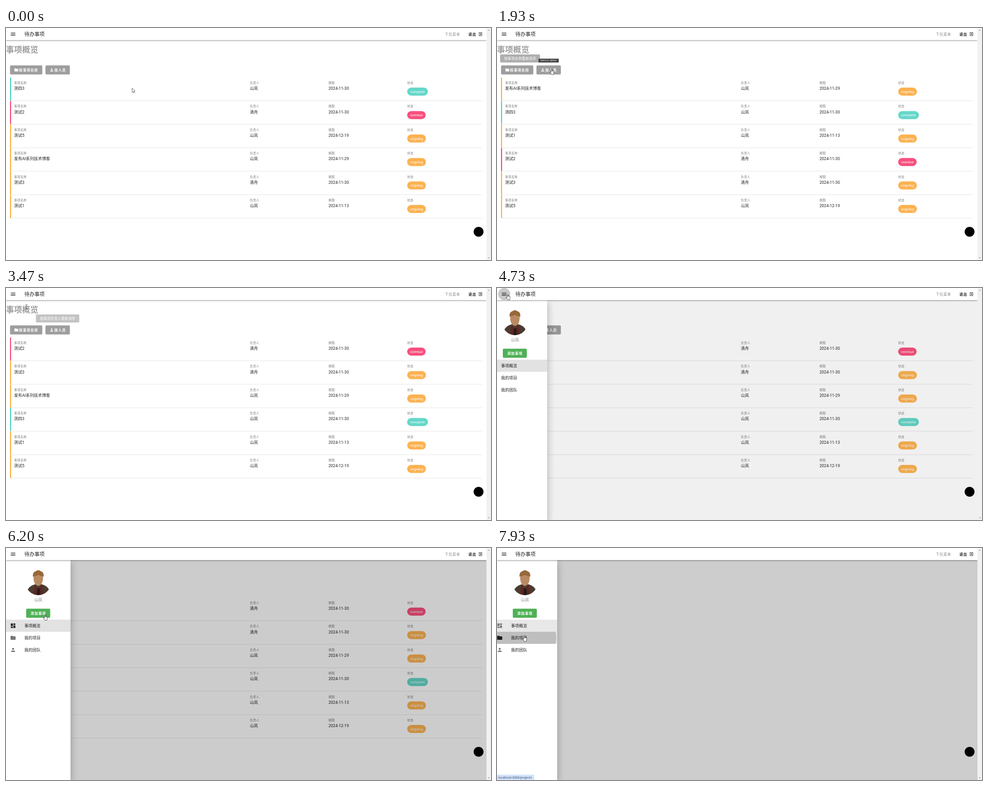
These frames come from a looping animation (1082 by 518 pixels, 8000 ms). An HTML page:

```html
<!DOCTYPE html>
<html lang="zh-CN">
<head>
<meta charset="utf-8">
<title>待办事项</title>
<style>
  html, body { margin: 0; width: 100%; height: 100%; overflow: hidden; background: #fff; }
  #stage { position: relative; width: 1082px; height: 518px; overflow: hidden; background: #fff; }
  #stage > *, #stage svg { position: absolute; left: 0; top: 0; }
  svg { display: block; overflow: hidden; }
  text { font-family: Roboto, "Noto Sans CJK SC", "Noto Sans CJK", sans-serif; font-size: 9.016px; fill: rgba(0,0,0,.87); white-space: pre; }
  .heading { font-size: 18.03px; font-weight: 700; fill: #9e9e9e; }
  .title { font-size: 11.27px; }
  .btn { font-size: 7.89px; font-weight: 700; letter-spacing: .704px; }
  .label { font-size: 6.76px; letter-spacing: .225px; fill: #7b7b7b; }
  .small { font-size: 7.89px; }
  .white { fill: #fff; }
  .grey { fill: #858585; }
  .status { font-family: "Open Sans", "Noto Sans", sans-serif; font-size: 6.9px; fill: #33405a; }
  #scrim { top: 27px !important; width: 1072px; height: 491px; background: #000; opacity: 0; }
  #drawer { top: 27px !important; width: 144px; height: 491px; background: #fff; }
  #drawer svg { top: -27px; overflow: visible; }
  #bar { width: 1072px; height: 27px; background: #fff;
    box-shadow: 0 1.1px 2.3px -.6px rgba(0,0,0,.3), 0 2.3px 2.8px rgba(0,0,0,.2), 0 .6px 5.6px rgba(0,0,0,.16); }
  #shade { width: 1072px; height: 518px; overflow: hidden; }
</style>
</head>
<body>
<div id="stage">
  <svg id="page" width="1072" height="518"></svg>
  <div id="shade"><div id="scrim" style="position:absolute"></div><div id="drawer" style="position:absolute"><svg id="menu" width="144" height="518"></svg></div></div>
  <div id="bar"><svg id="head" width="1072" height="27"></svg></div>
  <svg id="top" width="1082" height="518"></svg>
</div>
<script>
const $ = id => document.getElementById(id);

// markup helpers
const text = (x, y, str, cls = '', more = '') => `<text x="${x}" y="${y}" class="${cls}" ${more}>${str}</text>`;
const rect = (x, y, w, h, fill, r = 0, more = '') =>
  `<rect x="${x}" y="${y}" width="${w}" height="${h}" rx="${r}" fill="${fill}" ${more}/>`;
const ICONS = {
  menu: 'M3 6H21V8H3ZM3 11H21V13H3ZM3 16H21V18H3Z',
  board: 'M3 13H11V3H3ZM3 21H11V15H3ZM13 21H21V11H13ZM13 3V9H21V3Z',
  folder: 'M10 4H4C2.9 4 2 4.9 2 6V18A2 2 0 0 0 4 20H20A2 2 0 0 0 22 18V8C22 6.9 21.1 6 20 6H12Z',
  person: 'M12 4A4 4 0 0 1 12 12A4 4 0 0 1 12 4M12 14C16.4 14 20 15.8 20 18V20H4V18C4 15.8 7.6 14 12 14Z',
  exit: 'M19 3H5C3.9 3 3 3.9 3 5V9H5V5H19V19H5V15H3V19A2 2 0 0 0 5 21H19A2 2 0 0 0 21 19V5C21 3.9 20.1 3 19 3M10.1 15.6L11.5 17L16.5 12L11.5 7L10.1 8.4L12.7 11H3V13H12.7Z'
};
const icon = (name, cx, cy, size, fill, id = '') =>
  `<path id="${id}" d="${ICONS[name]}" fill="${fill}" transform="translate(${cx - size / 2} ${cy - size / 2}) scale(${size / 24})"/>`;

// list
const STATES = {
  complete: ['#3cd1c2', '#65d7c9', 46.2],
  overdue: ['#f83e70', '#f8517e', 41.2],
  ongoing: ['#ffaa2c', '#fcb252', 41.8]
};
const A = '山岚', B = '清舟';
const TASKS = [
  ['测四3', A, '2024-11-30', 'complete'],
  ['测试2', B, '2024-11-30', 'overdue'],
  ['测试5', A, '2024-12-19', 'ongoing'],
  ['发布AI系列技术博客', A, '2024-11-29', 'ongoing'],
  ['测试3', B, '2024-11-30', 'ongoing'],
  ['测试1', A, '2024-11-13', 'ongoing']
];
const ORDERS = [[0, 1, 2, 3, 4, 5], [3, 0, 5, 1, 4, 2], [1, 4, 3, 0, 5, 2]];
const COLS = [18, 544, 719.5, 895];
const LABELS = ['事项名称', '负责人', '期限', '状态'];

const row = ([name, who, due, state], i) => {
  const [edge, fill, w] = STATES[state];
  return `<g id="row${i}">` + rect(9, 110.6, 2.25, 51.6, edge) + rect(9, 162.2, 1053, .7, '#d9d9d9') +
    LABELS.map((l, c) => text(COLS[c], 125.1, l, 'label')).join('') +
    [name, who, due].map((v, c) => text(COLS[c], 138.2, v)).join('') +
    rect(895, 133, w, 18, fill, 9) +
    text(895 + w / 2, 144.8, state, 'small white', 'text-anchor="middle"') + '</g>';
};
const button = (n, x, w, name, label) =>
  `<clipPath id="clip${n}">${rect(x, 83.4, w, 20.3, '#000', 2.25)}</clipPath>` +
  rect(x, 83.4, w, 20.3, '#9e9e9e', 2.25) +
  `<g clip-path="url(#clip${n})"><circle id="wave${n}" cx="${x + w / 2}" cy="93.5" fill="#fff"/></g>` +
  icon(name, x + 14, 93.6, 10.1, '#fff') + text(x + 19.8, 96.7, label, 'btn white');
const tip = (n, x, w, str) => `<g id="tip${n}">` + rect(x, 59, w, 18, '#424242', 2.25) +
  text(x + 9, 70.8, str, 'small white') + '</g>';

$('page').innerHTML = text(0, 55.4, '事项概览', 'heading') +
  `<g id="list">${button(1, 9, 72, 'folder', '按事项名称')}${button(2, 88, 54.5, 'person', '按人员')}` +
  TASKS.map(row).join('') + '</g>' +
  tip(1, 7, 89, '按事项名称重新排序') + tip(2, 66.7, 96.8, '按事项负责人重新排序');

$('head').innerHTML = '<circle id="halo" cx="16" cy="13.5" r="13.6"/>' +
  icon('menu', 15.8, 13.5, 13.5, '#1c1c1c') + text(41, 17.6, '待办事项', 'title') +
  text(978.8, 16.8, '下拉菜单', 'btn grey', 'style="font-weight:500"') +
  text(1031.8, 16.8, '退出', 'btn') + icon('exit', 1058.4, 13.6, 10.1, '#1c1c1c');

const item = (n, name, label) => {
  const y = 160 + n * 27.05;
  return icon(name, 15.8, y + 13.5, 13.5, '#757575', 'icon' + n) + text(41, y + 16.8, label);
};
$('menu').innerHTML =
  `<clipPath id="round"><circle cx="72" cy="77" r="28.2"/></clipPath>
  <clipPath id="clip3">${rect(0, 187.05, 144, 27.05, '#000')}</clipPath>
  <g clip-path="url(#round)">
    <path d="M46 107Q45 88 62 82L72 79L83 82Q99 88 99 107Z" fill="#4b3b30"/>
    <path d="M64 82L72 92L80 82L84 107H61Z" fill="#5e2622"/>
    <path d="M70 90H75L77 107H68Z" fill="#211c1a"/>
    <path d="M61.5 62H82.5V70Q81 83 72 85Q63 83 61.5 70Z" fill="#b98a62"/>
    <path d="M60 64Q59 54 66 52Q72 47 78 52Q85 54 84 64Q72 59 60 64Z" fill="#98683a"/>
  </g>` +
  text(72, 119, A, 'grey', 'text-anchor="middle"') +
  rect(45, 135.4, 53.6, 20.3, '#4fb055', 2.25) + text(54.8, 149, '添加事项', 'btn white') +
  rect(0, 160, 144, 27.05, '#000', 0, 'id="cell0"') + rect(0, 187.05, 144, 27.05, '#000', 0, 'id="cell1"') +
  '<g clip-path="url(#clip3)"><circle id="wave3" cx="72" cy="200.5" fill="#000" opacity=".18"/></g>' +
  item(0, 'board', '事项概览') + item(1, 'folder', '我的项目') + item(2, 'person', '我的团队');

$('top').innerHTML = rect(1072, 0, 10, 518, '#f1f1f1') +
  '<path d="M1074.8 6L1077 3.4L1079.2 6ZM1074.8 512L1077 514.6L1079.2 512Z" fill="#a3a3a3"/>' +
  '<circle cx="1054.3" cy="455" r="11"/>' +
  `<g id="status"><path id="plate" fill="#d3e3fd"/>${text(3, 514.6, '', 'status', 'id="link"')}</g>` +
  `<g id="arrow"><path d="M.3 0V9.6L2.5 7.6L4.1 11.2L5.7 10.5L4.2 7H7Z" fill="#fff" stroke="#222" stroke-width=".7"/></g>
  <g id="hand"><path transform="translate(-3.8 0)" d="M2.8 1.2Q3.8-.4 4.8 1.2V5Q6-.1 6.3 5.3Q7.4 4.7 7.7 5.8Q9 5.3 9 6.8V9Q9 11 8 13H3.8Q3 11 .5 8.4Q0 7 1.3 7.1Q2.2 7.5 2.8 8.2Z" fill="#fff" stroke="#222" stroke-width=".8"/></g>
  <g id="beam"><path d="M-2.3-4.8H-.6L0-4.3L.6-4.8H2.3M0-4.3V4.3M-2.3 4.8H-.6L0 4.3L.6 4.8H2.3" fill="none" stroke="#333" stroke-width=".8"/></g>`;

// pointer track: time, x, y, shape
const TRACK = [
  [0, 281, 134, 'arrow'], [500, 122, 113, 'arrow'], [700, 62, 96, 'hand'], [870, 50, 92, 'hand'],
  [1400, 50, 92, 'hand'], [1800, 78, 91, 'hand'], [1860, 85, 91, 'arrow'], [1930, 121.7, 91, 'hand'],
  [3150, 121.7, 91, 'hand'], [3335, 112, 83, 'hand'], [3395, 84, 66, 'arrow'], [3460, 47, 44, 'beam'],
  [3525, 34, 25, 'arrow'], [3600, 26, 16, 'hand'], [3866, 23.8, 13.4, 'hand'], [5210, 23.8, 13.4, 'hand'],
  [5300, 50, 34, 'arrow'], [5530, 135, 92, 'arrow'], [5735, 135, 92, 'arrow'], [5866, 139, 95, 'arrow'],
  [6130, 96, 140, 'hand'], [6200, 86.8, 148.5, 'hand'], [6600, 57, 171, 'hand'], [7140, 57, 171, 'hand'],
  [7533, 61, 195.4, 'hand']
];

const clamp = v => Math.min(1, Math.max(0, v));
const span = (t, from, len) => clamp((t - from) / len);
const out = p => 1 - (1 - p) ** 3;
// cubic-bezier(.4, 0, .2, 1)
const ease = p => {
  let lo = 0, hi = 1, s = .5;
  for (let i = 0; i < 20; i++) {
    s = (lo + hi) / 2;
    const x = 1.2 * (1 - s) ** 2 * s + .6 * (1 - s) * s * s + s ** 3;
    if (x < p) lo = s; else hi = s;
  }
  return 3 * (1 - s) * s * s + s ** 3;
};
const set = (id, name, v) => $(id).setAttribute(name, v);

function pointer(t) {
  let i = TRACK.length - 1;
  while (TRACK[i][0] > t) i--;
  const a = TRACK[i], b = TRACK[i + 1] || a;
  const p = b === a ? 0 : (t - a[0]) / (b[0] - a[0]);
  const x = a[1] + (b[1] - a[1]) * p, y = a[2] + (b[2] - a[2]) * p;
  for (const shape of ['arrow', 'hand', 'beam']) set(shape, 'display', shape === a[3] ? 'inline' : 'none');
  set(a[3], 'transform', `translate(${x} ${y})`);
}

function tooltip(t, n, cx, start, end) {
  const s = out(span(t, start, 150));
  set('tip' + n, 'transform', `translate(${cx} 77) scale(${s}) translate(${-cx} -77)`);
  set('tip' + n, 'opacity', s ? 1 - span(t, end, 75) : 0);
}

function wave(t, n, start, size) {
  set('wave' + n, 'r', size * out(span(t, start, 300)));
  set('wave' + n, 'opacity', .22 * (1 - span(t, start + 200, 300)));
}

function render(t) {
  const order = ORDERS[t < 1190 ? 0 : t < 2530 ? 1 : 2];
  order.forEach((id, place) => set('row' + id, 'transform', `translate(0 ${place * 52.4})`));
  const left = t > 7920;
  set('list', 'display', left ? 'none' : 'inline');

  tooltip(t, 1, 45, 782, 1890);
  tooltip(t, 2, 115.2, 1905, 3415);
  wave(t, 1, 1050, 38);
  wave(t, 2, 2460, 30);

  set('halo', 'opacity', t < 4530 ? 0 : .24 * (1 - span(t, 4700, 290)));

  const open = ease(span(t, 4633, 200)) - ease(span(t, 7903, 200));
  $('drawer').style.transform = `translateX(${144 * (open - 1)}px)`;
  $('drawer').style.boxShadow = open > 0
    ? '0 4.5px 5.6px -2.8px rgba(0,0,0,.2), 0 9px 13.5px 1.1px rgba(0,0,0,.14), 0 3.4px 17px 2.8px rgba(0,0,0,.12)' : 'none';
  $('scrim').style.opacity = .2 * (ease(span(t, 4633, 370)) - ease(span(t, 7903, 370)));

  set('cell0', 'opacity', left ? .09 : .115);
  set('cell1', 'opacity', left ? .09 : t > 7790 ? .05 : 0);
  set('icon0', 'fill', left ? '#757575' : '#1c1c1c');
  set('icon1', 'fill', left ? '#1c1c1c' : '#757575');
  set('wave3', 'r', 73.2 * out(span(t, 7740, 300)));

  const deep = t > 7390;
  const w = 53 + 30 * span(t, 7330, 130);
  set('status', 'opacity', t < 6590 ? 0 : t < 6660 ? .5 : 1);
  set('plate', 'd', `M0 506H${w - 2}Q${w} 506 ${w} 508V518H0Z`);
  $('link').textContent = 'localhost:3000' + (deep ? '/projects' : '');

  pointer(t);
}

// the screen refreshes 15 times a second
const LOOP = 8000, FPS = 15;
const begin = performance.now();
let shown = -1;
function tick() {
  const t = (performance.now() - begin) % LOOP;
  const step = Math.min(119, Math.floor((t + 4) * FPS / 1000));
  if (step !== shown) render((shown = step) * 1000 / FPS);
  requestAnimationFrame(tick);
}
tick();
</script>
</body>
</html>
```
